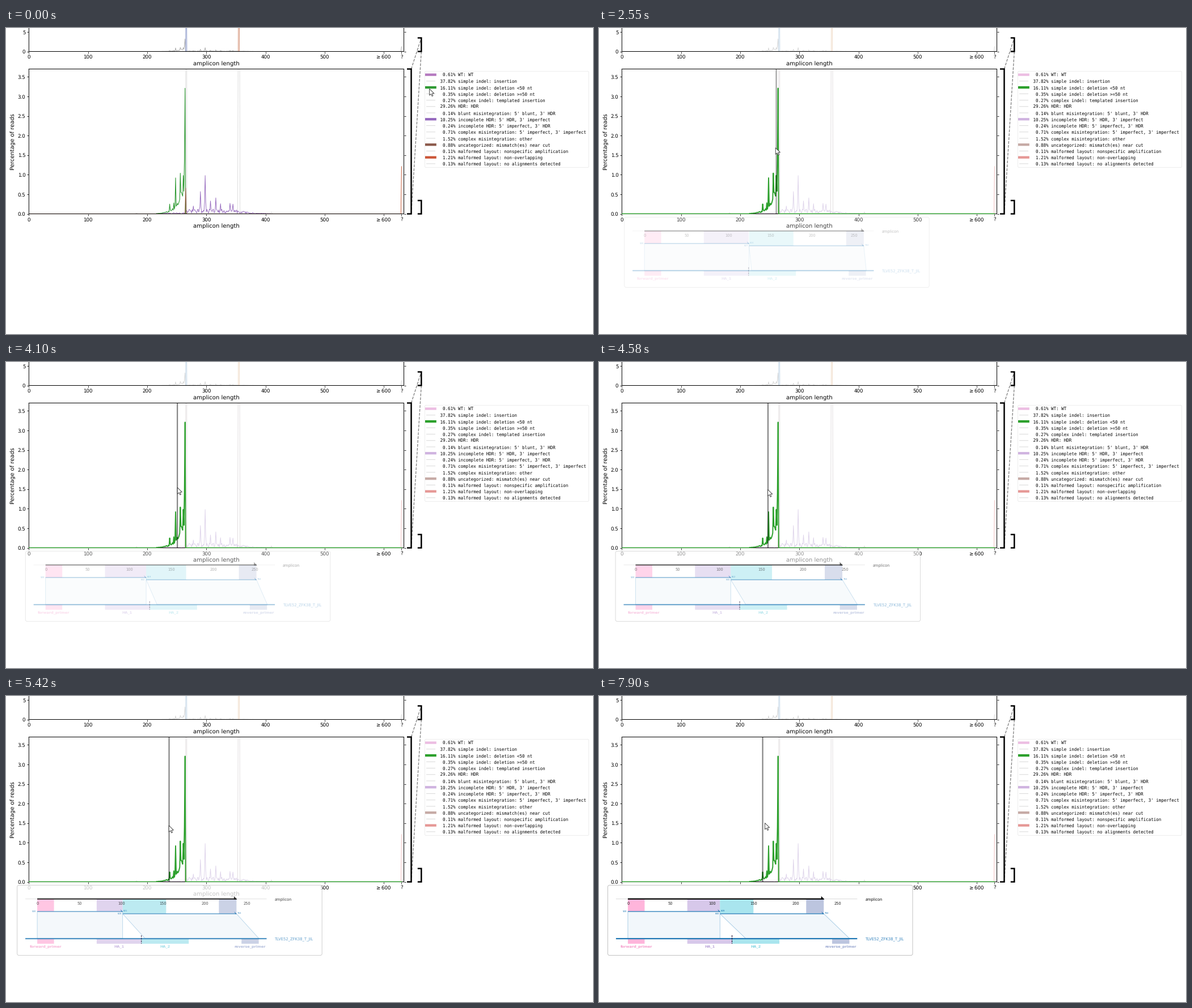
Write a matplotlib script that moves like this. It is 1035 by 541 pixels and loops after 7.99 s.

```python
import numpy as np
import matplotlib
import matplotlib.pyplot as plt
from matplotlib.animation import FuncAnimation
from matplotlib.colors import to_rgb
from matplotlib.patches import FancyBboxPatch, Polygon, Rectangle
from matplotlib.transforms import Affine2D

W, H, DPI = 1035, 541, 100
PT = 72 / DPI                     # points per pixel
INTERVAL, FRAMES = 34, 235
STEP, STEP_START = 80, 940        # pointer updates, in ms
LEFT, BASE_PX = 40.4, 1.0428      # plot origin and pixels per base
TOP, BOTTOM, UPPER_BOTTOM = 72.5, 328.6, 41.5
TIP_BASE, TIP_ORIGIN = 1.476, 35.6
REF_LEN, CUT = 265, 124.4

matplotlib.rcParams.update({"font.family": "DejaVu Sans",
                            "text.hinting": "none", "path.snap": False})

fig = plt.figure(figsize=(W / DPI, H / DPI), dpi=DPI, facecolor="white")
rng = np.random.default_rng(7)
bases = np.arange(631)


# ---- data ----------------------------------------------------------------
def spikes(peaks, foot=0.0):
    v = np.zeros(len(bases))
    for pos, height in peaks.items():
        for k in range(pos - 1, min(pos + 2, len(v))):
            v[k] = max(v[k], height if k == pos else foot * height)
    return v


def noise(first, last, low, high):
    inside = (bases >= first) & (bases < last)
    return inside * (low + (high - low) * rng.random(len(bases)))


growth = .025 * np.exp((bases - 226) / 10.2) * noise(216, 264, .6, 1.2)
deletion = np.maximum(growth, spikes({238: .25, 245: .28, 248: .92, 256: 1.04,
                                      261: .98, 263: 1.4, 264: 3.21}))
deletion[265] = 0

decay = np.exp(-np.maximum(bases - 348, 0) / 24)
imperfect = np.maximum(
    decay * noise(266, 412, .02, .12) + noise(225, 265, 0, .03),
    spikes({278: .2, 290: .57, 298: .98, 307: .33, 316: .41, 324: .26,
            340: .27, 345: .25}, .3))

mismatch = spikes({265: .66}, .06)
unpaired = spikes({630: 1.21})
insertion = spikes({266: 37})
repaired = spikes({355: 29})
repaired_wide = spikes({355: 29}, .2)
traces = spikes({182: .03, 232: .03, 410: .05}, .4)


# ---- panels --------------------------------------------------------------
def panel(top, bottom, unit, ticks, fmt):
    ax = fig.add_axes([LEFT / W, 1 - bottom / H, 634 * BASE_PX / W,
                       (bottom - top) / H])
    ax.set_xlim(0, 634)
    ax.set_ylim(0, (bottom - top) / unit)
    ax.set_xticks([0, 100, 200, 300, 400, 500, 600, 630],
                  ["0", "100", "200", "300", "400", "500", "≥\u2009600", "?"])
    ax.set_yticks(ticks, [fmt % v for v in ticks])
    ax.tick_params(length=3 * PT, width=.8 * PT, pad=3 * PT,
                   labelsize=8.6 * PT, right=True)
    for spine in ax.spines.values():
        spine.set_linewidth(PT)
    fig.text(371 / W, 1 - (bottom + 22) / H, "amplicon length",
             size=10.1 * PT, ha="center", va="center")
    return ax


upper = panel(-60, UPPER_BOTTOM, 6.9, [0, 5], "%d")
lower = panel(TOP, BOTTOM, 69.2, np.arange(0, 3.6, .5), "%.1f")
fig.text(12 / W, 1 - 201 / H, "Percentage of reads", size=10 * PT,
         rotation=90, ha="center", va="center")

fades = []                        # (line, colour before, colour after)


def curve(ax, values, before, after, width=.9):
    line, = ax.plot(bases, values, color=before, lw=width * PT, zorder=2)
    fades.append((line, to_rgb(before), to_rgb(after)))
    return line


for values in (insertion, repaired_wide, traces):
    curve(lower, values, "#d4d4d4", "#dad5d7", .75)
curve(lower, imperfect, "#9467bd", "#ddd2ea")
green = curve(lower, deletion, "#2f9a33", "#2ca02c")
curve(lower, mismatch, "#8c4a30", "#d9c4bf")
curve(lower, unpaired, "#c8552f", "#f5c0c0")

for values in (deletion, imperfect, unpaired):
    curve(upper, values, "#a8a8a8", "#d6d6d6")
curve(upper, insertion, "#6a7cbc", "#b4cde2", .8)
curve(upper, repaired, "#c97350", "#ecd2b8", .8)

# ---- overlay in pixel coordinates ----------------------------------------
stage = fig.add_axes([0, 0, 1, 1], zorder=5)
stage.set_xlim(0, W)
stage.set_ylim(H, 0)
stage.axis("off")


def stroke(xs, ys, color="black", width=1.0, **kw):
    kw.setdefault("solid_capstyle", "butt")
    line, = stage.plot(xs, ys, color=color, lw=width * PT, **kw)
    return line


def label(x, y, text, size, color="black", **kw):
    return stage.text(x, y + .37 * size, text, size=size * PT, color=color,
                      va="baseline", **kw)


def bracket(right, top, bottom, width):
    left = right - width
    stroke([left, right, right, left], [top, top, bottom, bottom], width=2.5,
           solid_joinstyle="miter")


bracket(714.5, TOP, BOTTOM, 7.5)
bracket(732.3, 17.5, UPPER_BOTTOM, 6.5)
bracket(732.3, 305, BOTTOM, 6.5)
for y0, y1 in ((TOP, 17.5), (BOTTOM, UPPER_BOTTOM)):
    stroke([714.5, 732.3], [y0, y1], "#808080", 1.3, dashes=(3.7, 1.6),
           zorder=1)

# ---- legend --------------------------------------------------------------
entries = [
    (.61, "WT: WT", ("#b478bf", "#ecbde2")),
    (37.82, "simple indel: insertion", None),
    (16.11, "simple indel: deletion <50 nt", ("#2f9a33", "#2ca02c")),
    (.35, "simple indel: deletion >=50 nt", None),
    (.27, "complex indel: templated insertion", None),
    (29.26, "HDR: HDR", None),
    (.14, "blunt misintegration: 5' blunt, 3' HDR", None),
    (10.25, "incomplete HDR: 5' HDR, 3' imperfect", ("#9467bd", "#cfb3e0")),
    (.24, "incomplete HDR: 5' imperfect, 3' HDR", None),
    (.71, "complex misintegration: 5' imperfect, 3' imperfect", None),
    (1.52, "complex misintegration: other", None),
    (.88, "uncategorized: mismatch(es) near cut", ("#8c5a4b", "#c6aaa5")),
    (.11, "malformed layout: nonspecific amplification", None),
    (1.21, "malformed layout: non-overlapping", ("#cb5638", "#e69896")),
    (.13, "malformed layout: no alignments detected", None),
]
stage.add_patch(FancyBboxPatch((740.5, 78.5), 285, 166, fc="white",
                               ec="#ebebeb", lw=.9 * PT,
                               boxstyle="round,pad=2,rounding_size=2"))
for i, (share, name, colors) in enumerate(entries):
    y = 82.6 + 11.24 * i
    if colors:
        swatch = stroke([739, 758.8], [y, y], colors[0], 4.3)
        fades.append((swatch, to_rgb(colors[0]), to_rgb(colors[1])))
    else:
        stroke([741, 757], [y, y], "#dcdcdc", 1.1)
    label(761, y, "%6.2f%% %s" % (share, name), 7.55,
          family="DejaVu Sans Mono")

# ---- tooltip, drawn relative to its left edge ----------------------------
shift = Affine2D()
tip_space = shift + stage.transData
tip = []
BLUE, PINK, VIOLET, CYAN, SLATE = ("#1f77b4", "#ffb5db", "#d7c8ea",
                                   "#a9e5ee", "#bcc5df")


def tip_add(artist):
    artist.set_transform(tip_space)
    tip.append(artist)
    return artist


def tip_rect(x0, x1, y0, y1, color):
    return tip_add(stage.add_patch(
        Rectangle((x0, y0), x1 - x0, y1 - y0, fc=color, lw=0, zorder=6)))


def tip_line(x0, x1, y, color, width):
    return tip_add(stroke([x0, x1], [y, y], color, width, zorder=8))


def tip_text(x, y, text, size=6.6, color="black", ha="left", **kw):
    return tip_add(label(x, y, text, size, color, ha=ha, zorder=9, **kw))


def tip_poly(color, **kw):
    return tip_add(stage.add_patch(
        Polygon([(0, 0)] * 3, fc=color, zorder=7, **kw)))


def at(base):
    return TIP_ORIGIN + TIP_BASE * base


tip_add(stage.add_patch(FancyBboxPatch(
    (3.2, 337.5), 531.5, 118, fc="white", ec="#bcbcbc", lw=.9 * PT, zorder=5,
    boxstyle="round,pad=3,rounding_size=3")))
tip_line(14.6, 440, 358.8, "#d0d0d0", .8)
tip_line(14.6, 440, 429, BLUE, 2.2)
tip_rect(at(0), at(20), 359, 381, PINK)
for a, b, color, ink, name in (
        (0, 20, PINK, "#f49ccb", "forward_primer"),
        (71, CUT, VIOLET, "#bba6da", "HA_1"),
        (CUT, 181, CYAN, "#86d5e2", "HA_2"),
        (244, 264.6, SLATE, "#9ba9d1", "reverse_primer")):
    tip_rect(at(a), at(b), 429, 438, color)
    tip_text(at((a + b) / 2), 442.6, name, 6.5, ink, "center", weight="bold")
tip_add(stroke([at(CUT)] * 2, [423, 438], "#241030", 1.2, dashes=(2.6, 1.2),
               zorder=9))
for base in range(0, 251, 50):
    tip_text(at(base) + .6, 366.8, str(base), 6.6, "#222222", "center")
tip_text(454, 358.8, "amplicon")
tip_text(454, 429, "TLVE52_ZFK38_T_JIL", 6.8, "#3a87c0")

homology_1 = tip_rect(0, 1, 359, 381, VIOLET)
homology_2 = tip_rect(0, 1, 359, 385, CYAN)
reverse = tip_rect(0, 1, 359, 385, SLATE)
edge = dict(ec="#a5cbe5", lw=.9 * PT)
left_link = tip_poly("#f2f7fb", **edge)
right_link = tip_poly("#f2f7fb", **edge)
arrow = tip_line(at(0), at(1), 358.8, "black", 2.2)
arrow_head = tip_poly("black", lw=0)
left_read = tip_line(at(0), at(1), 381, BLUE, 1.1)
right_read = tip_line(at(0), at(1), 385, BLUE, 1.1)
barbs = [tip_poly(BLUE, lw=0) for _ in range(2)]
tip_text(at(0) - 1.5, 381, "500", 3.9, BLUE, "right")
left_end = tip_text(0, 380.6, "", 3.9, BLUE)
right_start = tip_text(0, 385, "", 3.9, BLUE, "right")
right_end = tip_text(0, 384.6, "764", 3.9, BLUE)


def span(rect, a, b):
    rect.set_x(at(a))
    rect.set_width(max(0, at(b) - at(a)))


def set_tip(length, opacity):
    gap = REF_LEN - length
    split = min(125, 102 + max(1.3 * (length - 238), 2 * (238 - length)))
    mid, end = at(split), at(length)
    shift.clear().translate(LEFT + BASE_PX * length - 269.1, 0)
    span(homology_1, 71, min(split, CUT))
    span(homology_2, max(split, CUT - gap), 181 - gap)
    span(reverse, 244 - gap, length)
    left_link.set_xy([(at(0), 381), (mid, 381), (mid, 429), (at(0), 429)])
    right_link.set_xy([(mid, 385), (end, 385), (at(REF_LEN), 429),
                       (at(split + gap), 429)])
    arrow.set_xdata([at(0), end])
    left_read.set_xdata([at(0), mid])
    right_read.set_xdata([mid, end])
    arrow_head.set_xy([(end - 4.5, 353.8), (end + 1.2, 359.8), (end - 4.5, 359.8)])
    for barb, x, y in zip(barbs, (mid, end), (381, 385)):
        barb.set_xy([(x - 4, y - 4), (x + .5, y + .5), (x - 2, y + .5)])
    left_end.set_x(mid + 1.5)
    left_end.set_text("%d" % (499 + split))
    right_start.set_x(mid - 1.5)
    right_start.set_text("%d" % (499 + split + gap))
    right_end.set_x(end + 1.5)
    for artist in tip:
        artist.set_alpha(opacity)
        artist.set_visible(opacity > 0)


# ---- pointer and motion --------------------------------------------------
ruler = stroke([0, 0], [TOP, BOTTOM], "black", 2.2, zorder=10)
ARROW = np.array([(0, 0), (0, 11.4), (2.7, 9), (4.6, 13), (6.3, 12.2),
                  (4.6, 8.3), (8.2, 8.1)])
pointer = stage.add_patch(Polygon(ARROW, fc="white", ec="#3c3c3c",
                                  lw=.9 * PT, zorder=20))

REST, ENTER = np.array([746.6, 107.6]), np.array([327, 203])
# time, x, y
PATH = np.array([(1950, *ENTER), (2550, 311, 212), (2860, 311, 212),
                 (3330, 309.2, 216.5), (4540, 297.6, 225.5),
                 (5420, 287.2, 229), (5870, 287.2, 229), (6420, 284.2, 230),
                 (7899, 284.2, 230), (7900, 292.5, 224.5)]).T


def smooth(u):
    u = min(max(u, 0), 1)
    return u * u * (3 - 2 * u)


def position(t):
    if t < PATH[0, 0]:
        return REST + (ENTER - REST) * smooth((t - 900) / 1050)
    return np.array([np.interp(t, PATH[0], row) for row in PATH[1:]])


def nearest_base(x):
    return round((x - LEFT) / BASE_PX)


def draw(n):
    t = n * INTERVAL + INTERVAL / 2
    now = STEP_START + STEP * ((t - STEP_START) // STEP)
    here, last_x = position(now), position(now - STEP)[0]
    pointer.set_xy(ARROW + here)

    f = smooth((now + STEP - STEP_START) / 320)
    for line, before, after in fades:
        line.set_color([(1 - f) * a + f * b for a, b in zip(before, after)])
    green.set_linewidth((1.1 + .8 * f) * PT)
    green.set_zorder(4 if f > .5 else 2)

    opacity = np.interp(t, [1990, 2550, 4100, 4580, 6420],
                        [0, .25, .35, .58, 1])
    set_tip(nearest_base(last_x), opacity)
    ruler.set_xdata([LEFT + BASE_PX * nearest_base((here[0] + last_x) / 2)] * 2)
    ruler.set_alpha(.48 * min(1, 3 * opacity))
    return []


anim = FuncAnimation(fig, draw, frames=FRAMES, interval=INTERVAL,
                     init_func=lambda: draw(0), repeat=True, repeat_delay=0)
plt.show()
```
